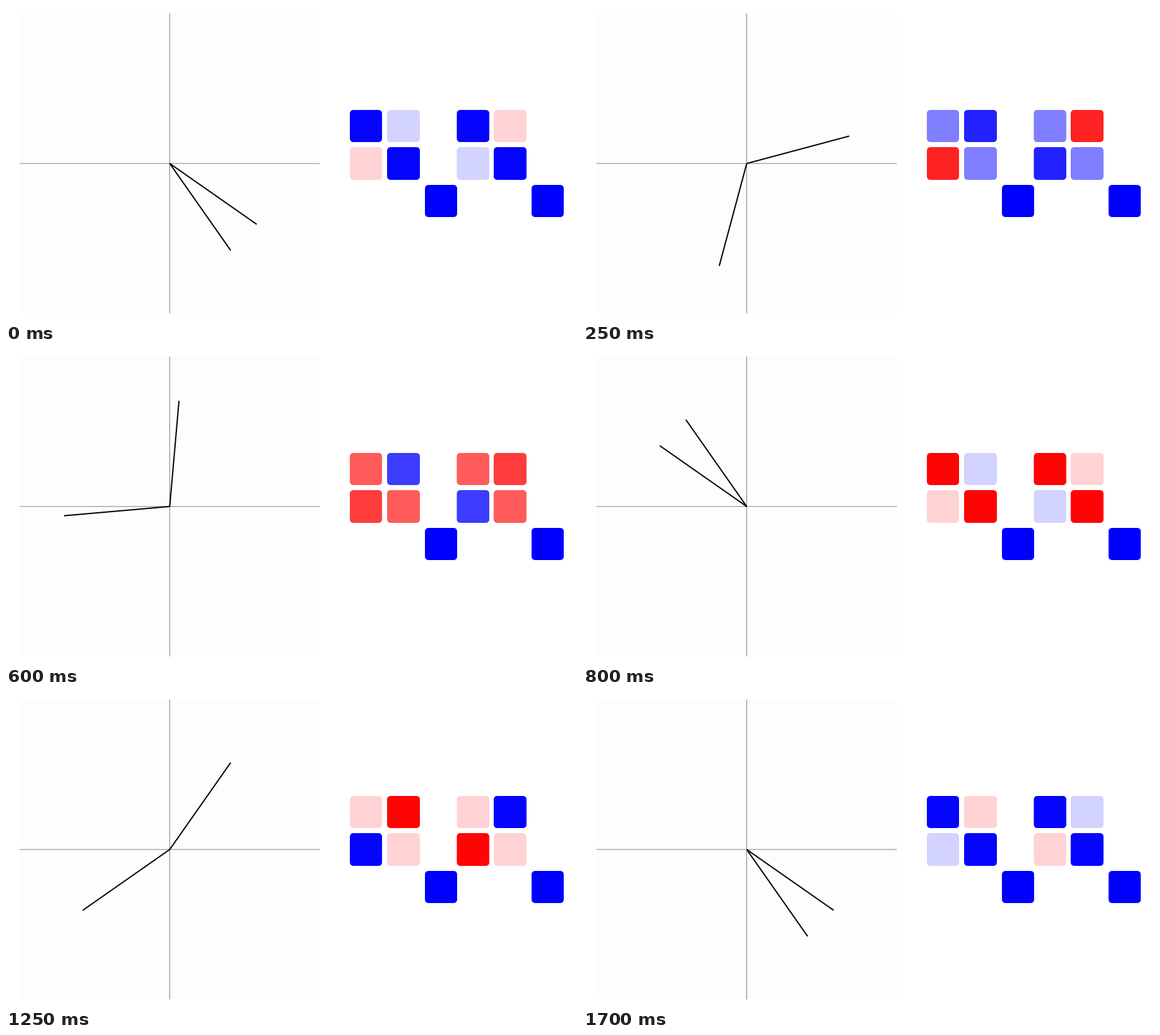
Write a matplotlib script that moves like this. It is 905 px wide and 500 px high and loops after 1.75 s.

```python
import numpy as np
import matplotlib.pyplot as plt
from matplotlib.animation import FuncAnimation
from matplotlib.patches import FancyBboxPatch, Rectangle

W, H, DPI = 905, 500, 100
FRAMES, INTERVAL = 35, 50
CX, CY, HALF = 259.5, 250, 238      # plot centre and half side
REACH = HALF / 2 * np.sqrt(2)       # length of the rotated vector (1, -1)
COLS = ((545, 596), (604, 656), (664, 715), (714.5, 766), (773, 825), (833, 884))
ROWS = ((165, 216), (224, 276), (284, 335))
RADIUS = 6

plt.rcParams["toolbar"] = "None"
fig = plt.figure(figsize=(W / DPI, H / DPI), dpi=DPI, facecolor="white")
ax = fig.add_axes([0, 0, 1, 1])
ax.set_xlim(0, W)
ax.set_ylim(H, 0)
ax.axis("off")


def stroke(xs, ys, width, color):
    line, = ax.plot(xs, ys, color=color, lw=width * 72 / DPI,
                    solid_capstyle="butt", snap=False)
    return line


def cell(row, col):
    (x0, x1), (y0, y1) = COLS[col], ROWS[row]
    box = FancyBboxPatch((x0, y0), x1 - x0, y1 - y0, lw=0, ec="none", snap=False,
                         boxstyle=f"round,pad=0,rounding_size={RADIUS}")
    return ax.add_patch(box)


def shade(value):
    """Blue for positive, red for negative, white at zero."""
    fade = 1 - min(abs(value), 1)
    return (fade, fade, 1) if value >= 0 else (1, fade, fade)


ax.add_patch(Rectangle((CX - HALF, CY - HALF), 2 * HALF, 2 * HALF,
                       fc="#fdfdfd", lw=0))
stroke([CX - HALF, CX + HALF], [CY, CY], 1, "#808080")
stroke([CX, CX], [CY - HALF, CY + HALF], 1, "#808080")
arms = [stroke([], [], 2, "black") for _ in range(2)]
grid = [[[cell(r, 3 * m + c) for c in range(3)] for r in range(3)] for m in range(2)]


def draw(i):
    turn = np.radians(10 * (i + 1))
    cos, sin = np.cos(turn), np.sin(turn)
    for arm, cells, sign in zip(arms, grid, (1, -1)):
        angle = sign * turn - np.pi / 4
        arm.set_data([CX, CX + REACH * np.cos(angle)],
                     [CY, CY - REACH * np.sin(angle)])
        matrix = ((cos, sign * sin, 0), (-sign * sin, cos, 0), (0, 0, 1))
        for boxes, values in zip(cells, matrix):
            for box, value in zip(boxes, values):
                box.set_facecolor(shade(value))
                box.set_visible(abs(value) > 1e-6)
    return arms


anim = FuncAnimation(fig, draw, frames=FRAMES, interval=INTERVAL,
                     init_func=lambda: draw(0), repeat=True, repeat_delay=0)
plt.show()
```
